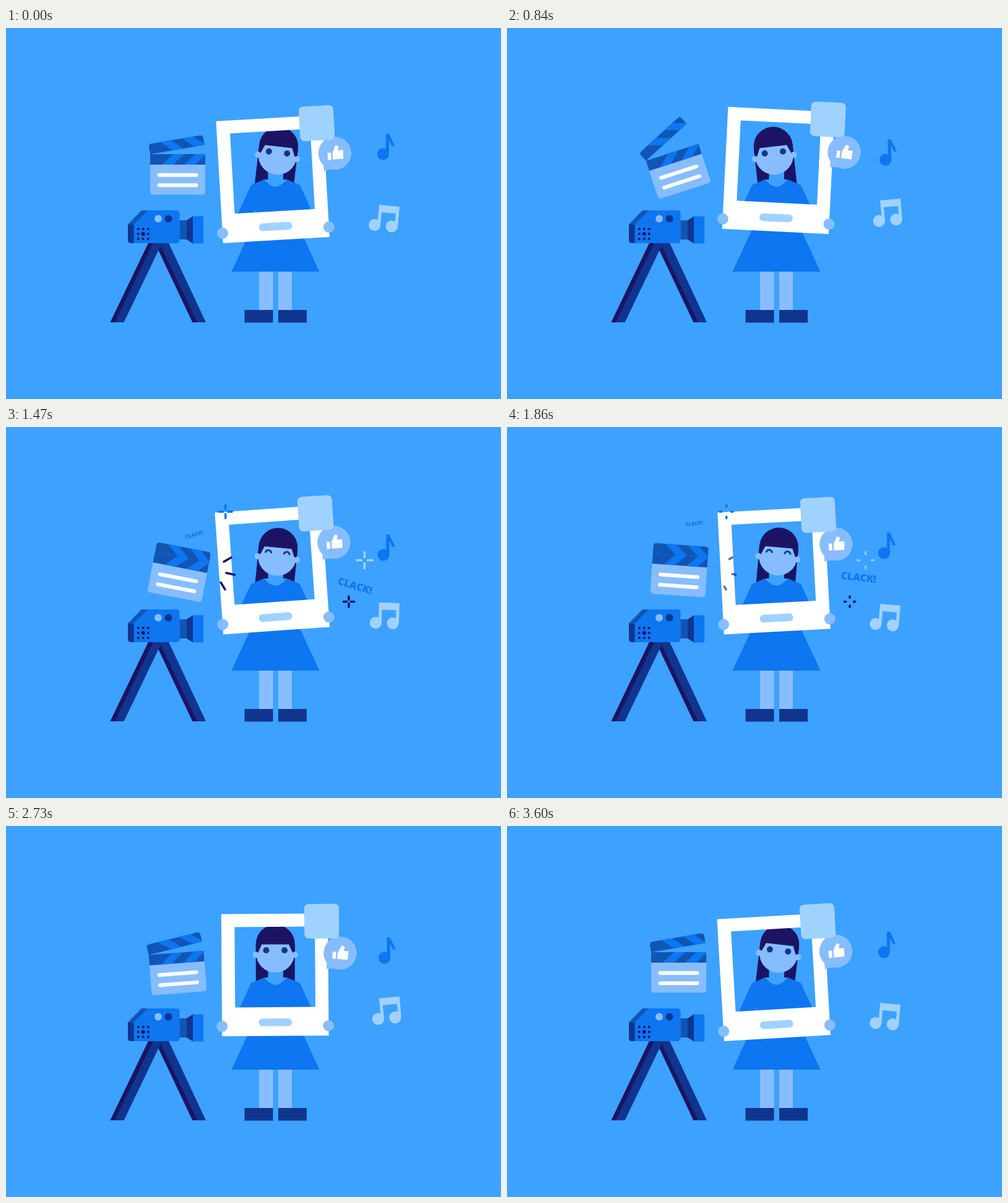
These frames come from a looping animation (800x600 px, 3630 ms). An HTML page:

```html
<!DOCTYPE html>
<html lang="en">
<head>
<meta charset="utf-8">
<title>Photo booth</title>
<style>
  html, body { margin: 0; height: 100%; overflow: hidden; background: #3da1ff; }
  svg { display: block; width: 800px; height: 600px; }
  text { font: 800 16px "Open Sans", "Noto Sans", sans-serif; text-anchor: middle; }
  .sky { fill: #3da1ff; } .skin { fill: #87bdff; } .pale { fill: #a0d2ff; }
  .blue { fill: #0d76f0; } .mid { fill: #1155b5; } .navy { fill: #10358f; }
  .ink { fill: #1b1464; } .white { fill: #fff; }
  .ray { fill: none; stroke-width: 3.6; stroke-linecap: round; }
</style>
</head>
<body>
<svg viewBox="0 0 800 600">
  <!-- tripod and camcorder -->
  <path class="navy" d="M241 348L301.5 476H323L263 348Z"/>
  <path class="ink" d="M241 348L301.5 476H309L248 348Z"/>
  <path class="navy" d="M230 348L168.500 476H190.500L252 348Z"/>
  <path class="ink" d="M230 348L168.500 476H176L238 348Z"/>
  <path class="navy" d="M197 317H207V348H202Q197 348 197 343Z"/>
  <path class="mid" d="M197 317.500L219 295H230L206.500 318.500Z"/>
  <path class="blue" d="M229 295H275.500Q280.500 295 280.500 300V343Q280.500 348 275.500 348H206.500V317.500Z"/>
  <circle class="skin" cx="246" cy="308.500" r="6"/>
  <circle class="navy" cx="262.500" cy="308.500" r="6"/>
  <g id="dots" class="ink"></g>
  <path class="mid" d="M280.500 311H292V342H280.500Z"/>
  <path class="navy" d="M292 311L302 304.500V348.500L292 342Z"/>
  <path class="blue" d="M302 304.500H319V348.500H302Z"/>

  <!-- clapperboard -->
  <g id="clap">
    <path class="skin" d="M-44.500 -26H44.500V18.500Q44.500 23.500 39.500 23.500H-39.500Q-44.500 23.500 -44.500 18.500Z"/>
    <path stroke="#fff" stroke-width="6" stroke-linecap="round" d="M-30 -8.300H30M-30 8.200H30"/>
    <g transform="translate(-44.500 -42)">
      <path class="mid" d="M0 0H89V17H0Z"/>
      <path class="blue" d="M37 0H55L37 17H19ZM73 0H89V1.800L73 17H55Z"/>
      <g id="arm">
        <path class="mid" d="M0 0V-11.500Q0 -16.500 5 -16.500H84Q89 -16.500 89 -11.500V0Z"/>
        <path class="blue" d="M19 -16.500H37L55 0H37ZM55 -16.500H73L89 -1.800V0H73Z"/>
      </g>
    </g>
  </g>

  <!-- girl -->
  <path class="skin" d="M409 390H431.500V457H409ZM440 390H462V457H440Z"/>
  <path class="navy" d="M385.500 456H431.500V476.500H385.500ZM440 456H486V476.500H440Z"/>
  <path class="blue" d="M407 302H464L506.500 394H364.500Z"/>
  <g id="backHair"><path class="ink" d="M-31.500 -47H31.500V18H-31.500Z"/></g>
  <path class="sky" d="M423.500 225H448V245H454Q435.500 269 417 245H423.500Z"/>
  <path class="blue" d="M396 254L417 245Q435.500 269 454 245L475 254L498 304H373Z"/>
  <path class="sky" d="M403.500 293L400 301H403Z"/>
  <g id="head">
    <circle class="skin" cy="-32" r="31"/>
    <path class="ink" d="M-31.500 -28V-47A31.500 31.500 0 0 1 31.500 -47V-28H30L22 -46.500H-22L-30 -28Z"/>
    <circle class="skin" cx="-31.700" cy="-29.700" r="5"/>
    <circle class="skin" cx="31.700" cy="-29.700" r="5"/>
    <g id="open" class="navy"><circle cx="-14.800" cy="-37" r="5"/><circle cx="14.800" cy="-37" r="5"/></g>
    <path id="shut" fill="none" stroke="#10358f" stroke-width="3"
      d="M-19.500 -36.500A4.600 4.600 0 0 1 -10.300 -36.500M10.300 -36.500A4.600 4.600 0 0 1 19.500 -36.500"/>
  </g>

  <!-- picture frame, bubble and badge -->
  <g id="frame">
    <path class="white" fill-rule="evenodd" d="M-86.200 -168.500H86.200V29H-86.200ZM-64.800 -147.500V-17.500H65V-147.500Z"/>
    <rect class="pale" x="-27" y=".8" width="54" height="12.400" rx="6.200"/>
    <circle class="skin" cx="-86" cy="13" r="9"/>
    <circle class="skin" cx="86" cy="13" r="9"/>
  </g>
  <g id="bubble">
    <circle class="skin" r="26.700"/>
    <path class="skin" d="M-20 27V12L-4 25Z"/>
    <path class="white" d="M-12 -1.500H-6.500V10H-12ZM-4 10V-1L2 -12.500L7 -10.500L5 -4H13.500L13 10Z"/>
  </g>
  <g id="badge"><rect class="pale" x="48" y="-184" width="56" height="56" rx="7"/></g>

  <!-- music -->
  <g id="note" class="blue">
    <circle cx="-7" cy="33" r="9.600"/>
    <path d="M-2.500 0H2.500L11.500 19.500L7.500 20.500L2.500 10V33H-2.500Z"/>
  </g>
  <g id="pair" class="pale">
    <circle cx="-21" cy="33" r="9.600"/><circle cx="6.700" cy="33" r="9.600"/>
    <path d="M-16.500 0H16.500V33H11.500V11.500H-11.500V33H-16.500Z"/>
  </g>

  <g id="rays"></g>
  <text id="small" class="blue">CLACK!</text>
  <text id="big" class="blue">CLACK!</text>
</svg>
<script>
const LOOP = 3630, END = 3600, CLACK = 1200;
const $ = id => document.getElementById(id);
const clamp = v => Math.max(0, Math.min(1, v));
const mix = (a, b, u) => a + (b - a) * u;

// Looping monotone cubic through (times, values)
function track(times, values) {
  const n = times.length;
  const span = i => (times[i + 1] ?? END) - times[i];
  const step = i => (values[(i + 1) % n] - values[i]) / span(i);
  const slope = values.map((_, i) => {
    const a = step((i + n - 1) % n), b = step(i);
    return a * b > 0 ? 2 * a * b / (a + b) : 0;
  });
  return t => {
    t = Math.min(t, END);
    const i = times.findLastIndex(k => k <= t), j = (i + 1) % n, d = span(i), u = (t - times[i]) / d;
    return mix(values[i], values[j], u * u * (3 - 2 * u))
      + d * u * (1 - u) * (slope[i] * (1 - u) - slope[j] * u);
  };
}

const sway = [0, 420, 840, 1080, 1470, 1650, 2160, 2730];
const snap = [0, 420, 840, 1110, 1230, 1470, 2160, 2730];
const frameY = track(sway, [314, 302, 300, 298, 300.5, 300.5, 305.5, 310.5]);
const frameTurn = track(sway, [-3.3, 2.8, 2.8, 2.6, -4, -4, -1.1, -.4]);
const headY = track(sway, [0, 0, 0, 0, 3.5, 3.5, 1.7, 0]);
const headTurn = track(sway, [6.6, -6.3, -6.3, -6, 5.5, 5.5, 3.5, 0]);
const bubbleX = track(sway, [531.5, 544.5, 545, 545, 530, 530, 536, 540]);
const bubbleY = track(sway, [202.5, 201.5, 201, 198, 186.5, 186.5, 197, 205.5]);
const bubbleTurn = track(sway, [-5, 5.5, 7, 6, -4, -4, 0, 5]);
const clapX = track(snap, [277.5, 277, 280, 280, 277, 276.5, 278, 278.2]);
const clapY = track(snap, [246, 252.5, 241, 241, 252, 252, 247, 247]);
const clapTurn = track(snap, [0, 6, -18, -18, 11, 11, -1.8, -4.4]);
const armTurn = track(snap, [-9.5, -5, -24.5, -24.5, 0, 0, 0, -9.6]);

const NS = "http://www.w3.org/2000/svg";
function add(parent, tag, attrs) {
  const el = document.createElementNS(NS, tag);
  for (const k in attrs) el.setAttribute(k, attrs[k]);
  return parent.appendChild(el);
}
for (let i = 0; i < 9; i++)
  add($("dots"), "circle", { cx: 213.7 + i % 3 * 8, cy: 325 + (i / 3 | 0) * 8, r: i === 4 ? 3 : 2 });

// Each ray runs from (x, y) to (x + dx, y + dy)
const rays = [];
function ray(x, y, dx, dy, stroke, gone) {
  rays.push({ x, y, dx, dy, gone, el: add($("rays"), "path", { class: "ray", stroke }) });
}
function spark(x, y, r, stroke, gone) {
  for (const [dx, dy] of [[r, 0], [-r, 0], [0, r], [0, -r]]) ray(x, y, dx, dy, stroke, gone);
}
spark(354.700, 137, 10.5, "#0d76f0", 2230);
spark(579.500, 215.500, 13, "#a0d2ff", 2100);
spark(554, 282.500, 8.500, "#1b1464", 2230);
ray(345, 222, 19, -11, "#1b1464", 2050);
ray(348, 234.200, 21.500, 4.800, "#1b1464", 2050);
ray(343, 244.600, 11, 18, "#1b1464", 2050);

function place(id, x, y, turn, scale = 1) {
  $(id).setAttribute("transform", `translate(${x} ${y}) rotate(${turn}) scale(${scale})`);
}

function draw(t) {
  place("clap", clapX(t), clapY(t), clapTurn(t));
  $("arm").setAttribute("transform", `rotate(${armTurn(t)})`);
  place("backHair", 435.3, 238 + headY(t), headTurn(t));
  place("head", 435.3, 238 + headY(t), headTurn(t));
  for (const id of ["frame", "badge"]) place(id, 435.2, frameY(t), frameTurn(t));
  place("bubble", bubbleX(t), bubbleY(t), bubbleTurn(t));

  const happy = t >= CLACK && t < 2310;
  $("open").style.display = happy ? "none" : "";
  $("shut").style.display = happy ? "" : "none";

  const bob = Math.cos(4 * Math.PI * t / LOOP);
  place("note", 617.2 - .6 * bob, 175.5 - 4.5 * bob, bob - .5);
  place("pair", 619.5, 282.4 + 5.1 * bob, 5 * bob);

  const since = t - CLACK;
  const tail = 1 - (1 - clamp(since / 1300)) ** 2;
  const tip = Math.max(tail, 1 - (1 - clamp(since / 240)) ** 2);
  for (const { x, y, dx, dy, gone, el } of rays) {
    el.setAttribute("d", `M${x + dx * tail} ${y + dy * tail}L${x + dx * tip} ${y + dy * tip}`);
    el.style.opacity = since > 0 ? clamp((gone - t) / 300) : 0;
  }

  const drift = (t - 1470) / 690, shown = clamp(since / 120);
  place("small", mix(305, 301, drift), mix(177, 145, drift), mix(-16, 0, drift), mix(.52, .48, drift));
  place("big", mix(562.5, 571.5, drift), mix(262, 238.5, drift), mix(17, -1, drift));
  $("small").style.opacity = shown * clamp((2190 - t) / 300);
  $("big").style.opacity = shown * clamp((2250 - t) / 300);
}

function tick() {
  draw(performance.now() % LOOP);
  requestAnimationFrame(tick);
}
tick();
</script>
</body>
</html>
```
